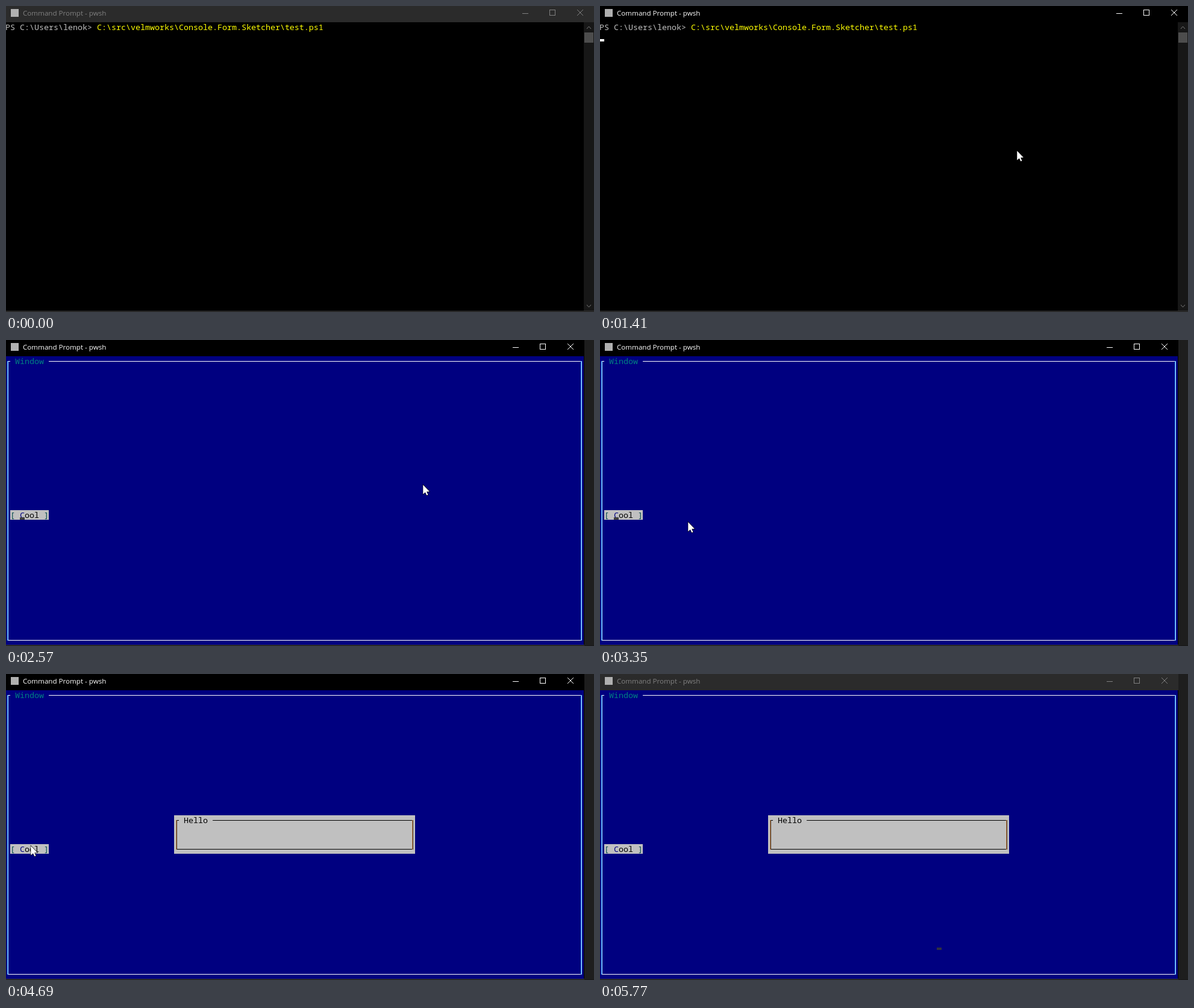
An HTML page with a canvas that plays this animation: 976x509 px, repeating every 5.87 s.

```html
<!DOCTYPE html>
<html lang="en">
<head>
<meta charset="utf-8">
<title>Terminal dialog</title>
<style>
html, body { margin: 0; width: 100%; height: 100%; overflow: hidden; background: #000; }
canvas { display: block; }
</style>
</head>
<body>
<canvas id="stage" width="976" height="509"></canvas>
<script>
const ctx = document.getElementById('stage').getContext('2d');
const LOOP = 5870, STEP = 77;
const MONO = '13.333px "Noto Sans Mono", "DejaVu Sans Mono", monospace';
const SANS = '11.6px "Open Sans", "Noto Sans", sans-serif';
const BLUE = '#000080', SILVER = '#c0c0c0';

// Pointer keys: time, x, y
const path = [
  [70, 964, 414], [500, 692, 241], [2570, 692, 241], [3120, 222, 297],
  [3350, 146, 303], [3660, 41, 287], [4690, 41, 286], [5220, 918, 462], [5390, 924, 494]
];

const between = (t, a, b) => t >= a && t < b;

function box(x, y, w, h, color) {
  ctx.fillStyle = color;
  ctx.fillRect(x, y, w, h);
}

function text(str, x, y, color, font = MONO) {
  ctx.font = font;
  ctx.fillStyle = color;
  ctx.fillText(str, x, y);
}

function stroke(points, color) {
  ctx.strokeStyle = color;
  ctx.lineWidth = 1;
  ctx.beginPath();
  points.forEach(([x, y], i) => i % 2 ? ctx.lineTo(x, y) : ctx.moveTo(x, y));
  ctx.stroke();
}

function titleBar(width, active) {
  const color = active ? '#fff' : '#808080';
  const right = width - 976;
  box(0, 0, width, 27, active ? '#000' : '#2b2b2b');
  box(8, 5, 13, 13, '#b0b0b0');
  text('Command Prompt - pwsh', 28, 16, color, SANS);
  box(857 + right, 12, 10, 1, color);
  ctx.strokeStyle = color;
  ctx.lineWidth = 1;
  ctx.strokeRect(902.5 + right, 6.5, 9, 9);
  const x = 948 + right;
  stroke([[x, 6], [x + 10, 16], [x + 10, 6], [x, 16]], color);
}

function scrollBar() {
  box(959, 27, 17, 480, '#171717');
  box(960, 44, 15, 17, '#4d4d4d');
  for (const [y, d] of [[38, -4], [497, 4]])
    stroke([[964, y], [967.5, y + d], [967.5, y + d], [971, y]], '#777');
}

// Single-line frame with a title gap in the top edge
function frame(x, y, w, h, title, color, textColor, edge, inner) {
  const gap = (title.length + 2) * 8;
  box(x, y, 4, 1, color);
  box(x + 4 + gap, y, w - 4 - gap, 1, color);
  box(x, y + h, w, 1, color);
  for (const side of [x, x + w]) {
    box(side - 1, y, 1, h + 1, edge);
    box(side, y, 1, h + 1, inner);
  }
  text(title, x + 12, y + 5, textColor);
}

function consoleView(t) {
  titleBar(976, t >= 500);
  scrollBar();
  text('PS C:\\Users\\lenok>', -1, 40, SILVER);
  text('C:\\src\\velmworks\\Console.Form.Sketcher\\test.ps1', 151, 40, '#ff0');
  if (between(t, 1040, 1410)) box(527, 39, 8, 4, '#fff');
  if (t >= 1410) box(-1, 55, 8, 4, '#fff');
}

function formView(t) {
  box(960, 0, 16, 509, '#1e1e1e');
  titleBar(960, t < 5770);
  box(0, 27, 959, 480, BLUE);
  frame(3, 35, 952, 464, 'Window', '#fff', '#008080', '#3c96ff', '#a0e0ff');

  box(7, 283, 64, 16, SILVER);
  text('[', 7, 296, '#004848');
  text('C', 23, 296, BLUE);
  text('ool', 31, 296, '#000');
  text(']', 63, 296, '#004848');
  if (between(t, 1640, 2040) || between(t, 2570, 3900)) box(23, 295, 8, 4, '#404040');

  if (t >= 3980) {
    box(279, 235, 400, 64, SILVER);
    frame(283, 243, 392, 48, 'Hello', '#000', '#000', '#b88450', '#402818');
  }
  if (between(t, 4040, 4690) || t >= 5770) box(559, 455, 8, 4, '#303040');
}

function pointerAt(t) {
  let i = path.length - 1;
  while (path[i][0] > t) i--;
  const [t0, x0, y0] = path[i];
  const [t1, x1, y1] = path[i + 1] || [t0 + 1, x0, y0];
  const held = Math.floor((t - t0) / STEP) * STEP;
  const p = held / (t1 - t0);
  const ease = p * p * (3 - 2 * p);
  return [Math.round(x0 + (x1 - x0) * ease), Math.round(y0 + (y1 - y0) * ease)];
}

function pointer(x, y) {
  const shape = [[0, 0], [0, 15.5], [3.6, 12.2], [6, 17.3], [8.2, 16.4], [5.9, 11.3], [10.6, 11]];
  ctx.beginPath();
  for (const [dx, dy] of shape) ctx.lineTo(x + dx + 0.3, y + dy);
  ctx.closePath();
  ctx.lineWidth = 1.2;
  ctx.strokeStyle = '#000';
  ctx.stroke();
  ctx.fillStyle = '#fff';
  ctx.fill();
}

function draw(now) {
  const t = now % LOOP;
  box(0, 0, 976, 509, '#000');
  if (t < 1640) consoleView(t);
  else formView(t);
  box(0, 507, t < 1640 ? 976 : 960, 1, '#3c3c3c');
  box(0, 508, 976, 1, '#181818');
  if (between(t, 70, 5470)) pointer(...pointerAt(t));
}

const start = performance.now();
(function tick() {
  draw(performance.now() - start);
  requestAnimationFrame(tick);
})();
</script>
</body>
</html>
```
